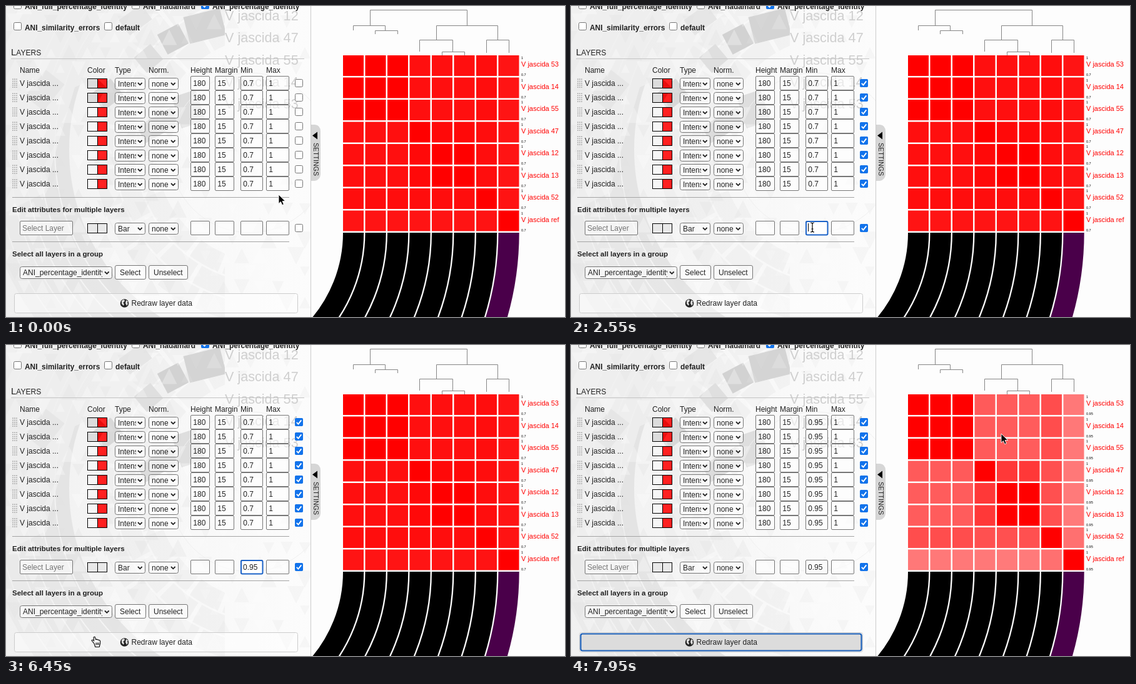
An HTML page that plays this animation: 894x498 px, repeating every 8 s.

```html
<!DOCTYPE html>
<html lang="en">
<head>
<meta charset="utf-8">
<title>Layer settings</title>
<style>
html, body { margin: 0; width: 894px; height: 498px; overflow: hidden; background: #fdfdfd; }
svg { display: block; font: 12px "Liberation Sans", Arial, sans-serif; fill: #222; }
.bold { font-weight: bold; }
.box { fill: #fff; fill-opacity: .55; stroke: #767676; }
.line { fill: none; stroke: #868686; }
.chevron { fill: none; stroke: #222; stroke-width: 1.8; }
.label { font-size: 11px; fill: #f00; }
.tiny { font-size: 5.5px; fill: #000; }

/* One loop is 8 s, so 1.875% is one 150 ms step. */
.a { animation: 8s step-end infinite; }
.check { animation-name: check; }
.old { animation-name: old; }
.new { animation-name: new; }
.heat-old { animation-name: heat-old; }
.heat-new { animation-name: heat-new; }
.ring { animation-name: ring; }
.caret { animation-name: caret; }
.d0 { animation-name: d0; }
.d1 { animation-name: d1; }
.d2 { animation-name: d2; }
.d3 { animation-name: d3; }
.press { animation-name: press; }
.pointer { animation-name: move; }
.arrow { animation-name: arrow; }
.beam { animation-name: beam; }
.hand { animation-name: hand; }

@keyframes check { 0% { opacity: 0 } 22.5%, 100% { opacity: 1 } }
@keyframes old { 0% { opacity: 1 } 82.5%, 100% { opacity: 0 } }
@keyframes new { 0% { opacity: 0 } 82.5%, 100% { opacity: 1 } }
@keyframes heat-old { 0% { opacity: 1 } 88.125%, 100% { opacity: 0 } }
@keyframes heat-new { 0% { opacity: 0 } 88.125%, 100% { opacity: 1 } }
@keyframes ring { 0% { opacity: 0 } 30% { opacity: 1 } 82.5%, 100% { opacity: 0 } }
@keyframes d0 { 0% { opacity: 0 } 41.25%, 100% { opacity: 1 } }
@keyframes d1 { 0% { opacity: 0 } 46.875%, 100% { opacity: 1 } }
@keyframes d2 { 0% { opacity: 0 } 54.375%, 100% { opacity: 1 } }
@keyframes d3 { 0% { opacity: 0 } 58.125%, 100% { opacity: 1 } }
@keyframes caret {
  0% { opacity: 0; transform: none }
  31.875% { opacity: 1; transform: none }
  39.375% { opacity: 0; transform: none }
  41.25% { opacity: 1; transform: translateX(6.7px) }
  46.875% { opacity: 1; transform: translateX(10px) }
  52.5% { opacity: 0; transform: translateX(10px) }
  54.375% { opacity: 1; transform: translateX(16.7px) }
  58.125% { opacity: 1; transform: translateX(23.4px) }
  63.75% { opacity: 0; transform: translateX(23.4px) }
  71.25% { opacity: 1; transform: translateX(23.4px) }
  76.875%, 100% { opacity: 0; transform: translateX(23.4px) }
}
@keyframes press {
  0% { opacity: 0; fill: #d6d6d6 }
  82.5% { opacity: 1; fill: #d6d6d6 }
  88.125%, 100% { opacity: 1; fill: #dcdcdc }
}
@keyframes move {
  0% { transform: translate(436px, 302px) }
  3.75% { transform: translate(478px, 275px) }
  5.625% { transform: translate(610px, 192px) }
  7.5% { transform: translate(709px, 145px) }
  9.375% { transform: translate(690px, 160px) }
  11.25% { transform: translate(570px, 248px) }
  13.125% { transform: translate(440px, 333px) }
  15% { transform: translate(405px, 353px) }
  16.875% { transform: translate(425px, 354px) }
  18.75% { transform: translate(456px, 354px) }
  20.625% { transform: translate(470px, 353px) }
  24.375% { transform: translate(463px, 353px) }
  26.25% { transform: translate(426px, 354px) }
  28.125% { transform: translate(392px, 354px) }
  30% { transform: translate(386px, 354px) }
  61.875% { transform: translate(381px, 356px) }
  63.75% { transform: translate(345px, 367px) }
  65.625% { transform: translate(285px, 388px) }
  67.5% { transform: translate(215px, 408px) }
  69.375% { transform: translate(160px, 420px) }
  71.25% { transform: translate(118px, 425px) }
  73.125% { transform: translate(104px, 426px) }
  75% { transform: translate(108px, 436px) }
  76.875% { transform: translate(122px, 452px) }
  78.75% { transform: translate(138px, 464px) }
  80.625% { transform: translate(142px, 467px) }
  82.5% { transform: translate(146px, 474px) }
  93.75% { transform: translate(290px, 402px) }
  95.625% { transform: translate(580px, 245px) }
  97.5% { transform: translate(797px, 165px) }
  99.375%, 100% { transform: translate(688px, 142px) }
}
@keyframes arrow {
  0% { opacity: 1 } 15% { opacity: 0 } 18.75% { opacity: 1 } 26.25% { opacity: 0 }
  63.75% { opacity: 1 } 78.75% { opacity: 0 } 93.75%, 100% { opacity: 1 }
}
@keyframes beam {
  0% { opacity: 0 } 15% { opacity: 1 } 18.75% { opacity: 0 } 26.25% { opacity: 1 } 63.75%, 100% { opacity: 0 }
}
@keyframes hand { 0% { opacity: 0 } 78.75% { opacity: 1 } 93.75%, 100% { opacity: 0 } }
</style>
</head>
<body>
<svg width="894" height="498" viewBox="0 0 894 498">
  <defs>
    <clipPath id="panel"><path d="M0 0H487V498H0Z"/></clipPath>
    <clipPath id="plot"><path d="M0 0H350V498H0Z"/></clipPath>
    <clipPath id="bands"><path d="M488 363H894V498H488Z"/></clipPath>
    <clipPath id="type"><path d="M174 0H208V498H174Z"/></clipPath>
    <clipPath id="group"><path d="M22 410H154V440H22Z"/></clipPath>
    <linearGradient id="shade" x1="0" y1="0" x2="1" y2="0">
      <stop offset="0" stop-color="#f0f0f0"/><stop offset=".45" stop-color="#f6f6f6"/><stop offset="1" stop-color="#fcfcfc"/>
    </linearGradient>
  </defs>

  <g id="backdrop" clip-path="url(#panel)"></g>
  <path d="M487.5 0V498" stroke="#ccc"/>
  <path d="M488 190H494Q503 191 503 201V269Q503 278 494 280H488Z" fill="#d6d6d6"/>
  <path d="M490 207.5L498 201.5V213.5Z" fill="#000"/>
  <text transform="translate(491.5 219) rotate(90)" font-size="10.6">SETTINGS</text>

  <g id="form"></g>

  <g class="line">
    <path d="M582.5 31V6.5H737.5V31M555.5 39V31.5H606.5V39M590.5 45V39.5H626.5V45"/>
    <path d="M688.5 54V31.5H786.5V54M661.5 73V54.5H714.5V73M697.5 79V73.5H733.5V79M768.5 75V54.5H804.5V75"/>
  </g>
  <g id="heat"></g>
  <g id="arcs" clip-path="url(#bands)" fill="none"></g>

  <g class="a pointer">
    <path class="a arrow" d="M0 0V14.5L3.4 11.4L5.7 16.7L8.3 15.6L6 10.5H10.7Z" fill="#000" stroke="#fff" stroke-width=".9"/>
    <g class="a beam" fill="none">
      <path d="M-3 -7Q0 -7 0 -5Q0 -7 3 -7M0 -5V6M-3 8Q0 8 0 6Q0 8 3 8M-1.5 3H1.5" stroke="#fff" stroke-width="2.6"/>
      <path d="M-3 -7Q0 -7 0 -5Q0 -7 3 -7M0 -5V6M-3 8Q0 8 0 6Q0 8 3 8M-1.5 3H1.5" stroke="#000" stroke-width="1.2"/>
    </g>
    <path class="a hand" d="M-1.3 10.3L-4 7.6Q-5.6 5.8 -4 5.2Q-3 5 -1.4 6.7L-1.9 1.6Q-1.6 -.3 .3 .6L1.4 4.6Q2.9 3.5 3.8 5Q5.4 4.1 6.2 5.7Q8 5 8.6 7L8.7 11L7.2 16.5H.8Z M2 9.5V13.5M4.2 9.5V13.5M6.3 9.5V13.5" fill="#fff" stroke="#000" stroke-width="1.1"/>
  </g>
</svg>

<script>
const $ = id => document.getElementById(id);
const range = n => [...Array(n).keys()];
const text = (x, y, s, attrs = "") => `<text x="${x}" y="${y}" ${attrs}>${s}</text>`;
const rect = (x, y, w, h, attrs = 'class="box"', r = 0) =>
  `<rect x="${x}" y="${y}" width="${w}" height="${h}" rx="${r}" ${attrs}/>`;
const path = (d, attrs) => `<path d="${d}" ${attrs}/>`;
const bold = (x, y, s, size) => text(x, y, s, `class="bold" font-size="${size}"`);

function seeded(seed) {
  return () => (seed = seed * 16807 % 2147483647) / 2147483647;
}

function backdrop() {
  const rnd = seeded(41), hub = 'cx="420" cy="230" fill="none"';
  const quad = (x, y, w, h, turn, fill) =>
    rect(-w / 2, -h / 2, w, h, `transform="translate(${x} ${y}) rotate(${turn})" fill="${fill}"`);
  let s = rect(0, 0, 487, 498, 'fill="url(#shade)"') + '<g clip-path="url(#plot)">';
  for (const i of range(6))
    s += `<circle ${hub} r="${330 + i * 24}" stroke="#e2e2e2" stroke-width="22" opacity="${.8 - i * .08}"/>`;
  s += path("M0 0H240L200 90L110 130L60 300L0 330Z", 'fill="#f1f1f1" opacity=".8"');
  for (const i of range(3))
    s += `<circle ${hub} r="${196 + i * 34}" stroke="#e6e6e6" stroke-width="31" stroke-dasharray="${48 + i * 6} 7" opacity=".4"/>`;
  s += quad(267, 53, 38, 36, -28, "#d2d2d2") + quad(318, 32, 60, 44, -14, "#d4d4d4")
    + quad(228, 84, 34, 32, -40, "#dfdfdf") + quad(162, 142, 40, 34, -38, "#d8d8d8")
    + quad(245, 190, 66, 30, -30, "#dcdcdc") + quad(292, 165, 40, 52, -18, "#dedede")
    + quad(207, 22, 44, 30, -36, "#e6e6e6") + quad(62, 135, 54, 38, -52, "#e6e6e6") + '</g>';
  for (const row of range(20))
    for (const col of range(17)) {
      const x = col * 29 + (row % 2) * 14, y = row * 25, r = 7 + rnd() * 7;
      const dir = rnd() > .5 ? 1 : -1, fill = rnd() > .45 ? "#fff" : "#e2e2e2";
      if (rnd() > .3)
        s += path(`M${x - r} ${y + r * dir}h${2 * r}l${-r} ${-2 * r * dir}Z`,
          `fill="${fill}" opacity="${x > 300 ? .2 : .3}"`);
    }
  s += `<circle cx="390" cy="235" r="128" fill="none" stroke="#f0f0f0"/>`;
  ["12", "47", "55", "14", "53"].forEach((n, i) =>
    s += text(350, 23 + i * 35.3, "V jascida " + n, 'font-size="21.6" fill="#cfcfcf"'));
  return s;
}

const checkbox = (x, y) => rect(x + .5, y + .5, 12, 12, 'fill="#fff" stroke="#767676"', 2);
const tick = (x, y, cls = "") => `<g class="${cls}">` + rect(x, y, 13, 13, 'fill="#1273eb"', 2)
  + path(`M${x + 2.8} ${y + 6.8}l2.7 2.8l4.8 -6.2`, 'fill="none" stroke="#fff" stroke-width="1.9"') + "</g>";

function select(x, y, w, value, clip = "", h = 19) {
  const mid = y + h / 2;
  return rect(x + .5, y + .5, w - 1, h - 1, 'class="box"', 3)
    + text(x + 5, mid + 4.3, value, clip && `clip-path="url(#${clip})"`)
    + path(`M${x + w - 12} ${mid - 1.5}l3.3 3.3l3.3 -3.3`, 'class="chevron"');
}

// Colour swatches, selects, number fields and the checkbox shared by all rows
function fields(mid, type, clip, first, second, values) {
  const top = mid - 11.5;
  const boxes = [[295, 30], [334, 30], [375, 35], [416, 36]];
  return rect(130.5, mid - 7, 16, 15, `fill="${first}" stroke="#000"`)
    + rect(146.5, mid - 7, 15, 15, `fill="${second}" stroke="#000"`)
    + select(174, mid - 8.5, 49, type, clip) + select(228, mid - 8.5, 48, "none")
    + boxes.map(([x, w], i) => rect(x + .5, top + .5, w, 22, 'class="box"', 1.5)
        + (values[i] ? text(x + 4.3, mid + 4, values[i], i == 2 ? 'class="a old"' : "") : "")).join("")
    + checkbox(462, mid - 6.5) + tick(462, mid - 6.5, "a check");
}

function form() {
  let s = [[12, -8], [201, -8], [312, -8], [12, 26], [157, 26]].map(p => checkbox(...p)).join("") + tick(312, -8);
  s += bold(30, 5, "ANI_full_percentage_identity", 11.9) + bold(219, 5, "ANI_hadamard", 11.9)
    + bold(330, 5, "ANI_percentage_identity", 11.9) + bold(30, 38.5, "ANI_similarity_errors", 11.9)
    + bold(175, 38.5, "default", 11.9);
  s += text(8, 79, 'L<tspan font-size="12">AYERS</tspan>', 'font-size="15"')
    + path("M8 84.5H477", 'stroke="#c4c4c4"');
  const heads = { Name: 22, Color: 130, Type: 174, "Norm.": 228, Height: 295, Margin: 334, Min: 375, Max: 416 };
  for (const h in heads) s += text(heads[h], 107, h);

  for (const i of range(8)) {
    const mid = 123.5 + i * 23;
    for (const x of [11, 14, 17])
      s += path(`M${x} ${mid - 7}V${mid + 9}`, 'stroke="#999" stroke-width="1.5" stroke-dasharray="1.5 1.7"');
    s += text(22, mid + 4, "V jascida ...")
      + fields(mid, "Intensity", "type", i < 2 ? "#dcdcdc" : "#f6f6f6", "#ff2020", ["180", "15", "0.7", "1"])
      + text(379.3, mid + 4, "0.95", 'class="a new"');
  }
  s += path("M147 117L161 131H147Z", 'fill="#d80000" opacity=".6"')
    + path("M147 154V140H155Z", 'fill="#d80000" opacity=".5"');

  s += path("M10 306.5H453M10 377.5H453", 'stroke="#a4a4a4"')
    + bold(10, 330, "Edit attributes for multiple layers", 11.5)
    + rect(22.5, 344.5, 84, 22, 'class="box"', 1.5) + text(26, 360, "Select Layer", 'fill="#757575"')
    + fields(355.5, "Bar", "", "#e8e8e8", "#e8e8e8", []);
  s += rect(376, 345, 34.5, 21.5, 'class="a ring" fill="#fff" stroke="#1b62c8" stroke-width="2"', 2);
  [..."0.95"].forEach((c, i) => s += text([379, 385.7, 389, 395.7][i], 359.7, c, `class="a d${i}"`));
  s += rect(379, 348, 1, 13, 'class="a caret" fill="#000"');

  s += bold(10, 401, "Select all layers in a group", 11.5)
    + select(22, 417, 148, "ANI_percentage_identity", "group", 20);
  for (const [x, w, label] of [[174, 49, "Select"], [228, 62, "Unselect"]])
    s += rect(x + .5, 415.5, w, 22, 'class="box"', 2.5) + text(x + 8, 430.5, label);

  s += rect(13.5, 460.5, 453, 31, 'fill="#fff" fill-opacity=".45" stroke="#ccc"', 3)
    + rect(15.5, 462.5, 449, 27, 'class="a press" stroke="#1b5fb8" stroke-width="2.2"', 3)
    + `<circle cx="189.5" cy="476" r="6.8" fill="#222"/>`
    + path("M185 472l3-2l2 1l-1 3l-2 1l2 2l-1 3l-3-3ZM192 471l3 2l-1 2l1 2l-2 3l-2-4Z", 'fill="#ddd"')
    + text(200.5, 480, "Redraw layer data");
  return s;
}

// Cell lightness by cluster pair; the narrow range spreads values six times wider.
const pitch = 35.5;
const cluster = [0, 0, 0, 1, 2, 2, 3, 4];
const spread = [
  [0, 90, 92, 77, 120],
  [90, 0, 56, 80, 120],
  [92, 56, 0, 80, 122],
  [77, 80, 80, 0, 112],
  [120, 120, 122, 112, 0]
];

function heat(cls, scale, min) {
  let s = `<g class="a ${cls}">`;
  for (const r of range(8)) {
    const y = 79 + r * pitch;
    for (const c of range(8)) {
      const v = Math.round(spread[cluster[r]][cluster[c]] * scale);
      s += rect(539 + c * pitch, y, 33, 33, `fill="rgb(255,${v},${v})"`);
    }
    s += text(824, y + 33, min, 'class="tiny"');
  }
  return s + "</g>";
}

function arcs() {
  return range(8).map(i => `<circle cx="327" cy="363" r="${228.6 + i * pitch}" `
    + `stroke="${i == 7 ? "#4a004a" : "#000"}" stroke-width="33.2"/>`).join("");
}

$("backdrop").innerHTML = backdrop();
$("form").innerHTML = form();
$("heat").innerHTML = heat("heat-old", 1 / 6, "0.7") + heat("heat-new", 1, "0.95")
  + ["53", "14", "55", "47", "12", "13", "52", "ref"].map((n, i) =>
      text(824, 97.3 + i * pitch, "V jascida " + n, 'class="label"')
      + text(824, 85 + i * pitch, "1", 'class="tiny"')).join("");
$("arcs").innerHTML = arcs();
</script>
</body>
</html>
```
